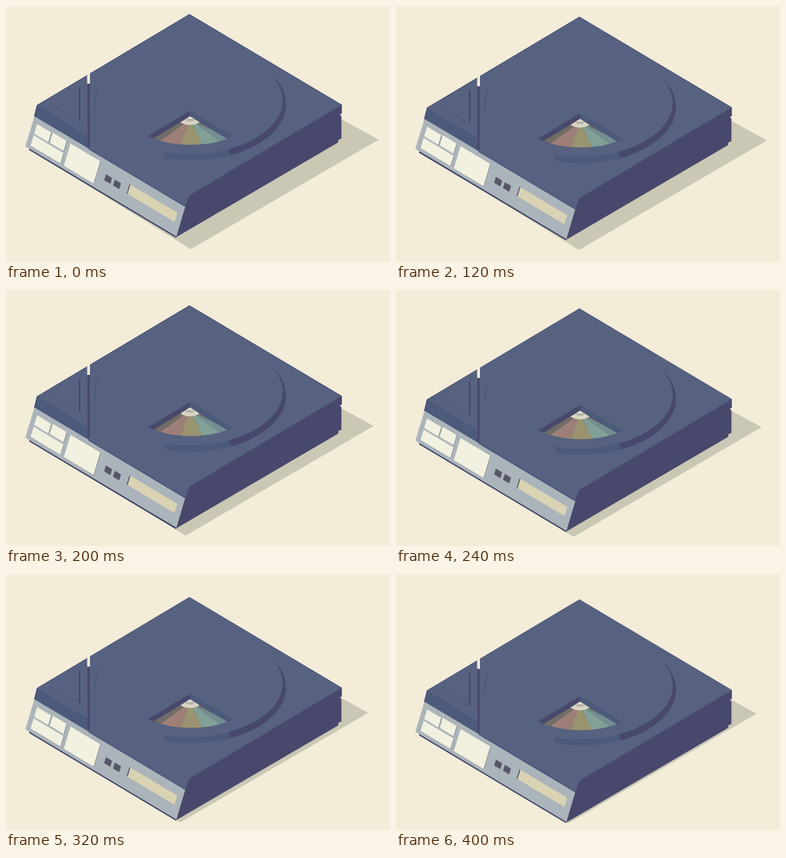
An HTML page with a canvas for the animation above (0.44 s loop, 480x320 px).

```html
<!DOCTYPE html>
<html lang="en">
<head>
<meta charset="utf-8">
<title>Floating disc player</title>
<style>
  html, body { margin: 0; width: 100%; height: 100%; overflow: hidden; background: #f2ecd9; }
  canvas { display: block; }
</style>
</head>
<body>
<canvas id="stage" width="480" height="320"></canvas>
<script>
const ctx = document.getElementById('stage').getContext('2d');
const LOOP = 440, STEP = 40, DROP = 22;
const PAPER = '#f2ecd9', SHADOW = '#cbc7b5', TOP = '#56627f', SIDE = '#47486b',
      EDGE = '#343c68', BEVEL = '#4c5a7b', PANEL = '#abb4ba', CREAM = '#f2f1e0';

// A plane maps (u, v) in 0..1 to the stage: origin + u * across + v * along.
const plane = (origin, across, along) => (u, v) =>
  [0, 1].map(i => origin[i] + u * across[i] + v * along[i]);
const lid = plane([39, 124], [190, 113], [190.3, -113.5]);
const panel = plane([35.5, 138], [188.5, 112.5], [-11.3, 37.5]);
const below = ([x, y], dy) => [x, y + dy];

function trace(points) {
  ctx.beginPath();
  points.forEach(point => ctx.lineTo(...point));
}

function fill(color, ...points) {
  if (points.length) trace(points);
  ctx.closePath();
  ctx.fillStyle = color;
  ctx.fill();
}

function line(color, width, ...points) {
  trace(points);
  ctx.strokeStyle = color;
  ctx.lineWidth = width;
  ctx.stroke();
}

function ellipse(color, x, y, rx, ry) {
  ctx.beginPath();
  ctx.ellipse(x, y, rx, ry, 0, 0, 2 * Math.PI);
  fill(color);
}

function inset(color, left, right, top, bottom) {
  fill(color, panel(left, top), panel(right, top), panel(right, bottom), panel(left, bottom));
}

// Crescent between the rim of the disc lid and its recess, from angle a to b.
function groove(color, a, b) {
  ctx.beginPath();
  ctx.ellipse(231, 123, 119, 70, 0, a, b);
  ctx.ellipse(229, 118, 117, 67, 0, b, a, true);
  fill(color);
}

function drawShadow(progress) {
  ctx.save();
  ctx.translate(-15.5 * progress, 7.5 * progress);
  fill(SHADOW, [466, 167], [231, 304], [40, 186], [380, 120]);
  ctx.restore();
}

function drawBody() {
  const left = lid(0, 0), back = lid(0, 1), right = lid(1, 1), front = lid(1, 0);
  const tip = below(panel(1, 1), 1), [x, y] = right;
  fill(SIDE, front, right, [x, y + 11], [x - 2, y + 12], [x, y + 14],
       [x, y + 42], [x - 4, y + 44], [x - 4, y + 47], tip, panel(1, 0));
  fill(TOP, left, back, right, front, panel(1, 0), panel(0, 0));
  fill(BEVEL, left, [103, 163], [103, 178], panel(0, 0));
  line(EDGE, 0.8, panel(0, 0), left, back, right, below(right, 11));
  line('#414a70', 0.7, right, front, panel(1, 0));
}

function drawLid() {
  groove(SIDE, -0.53, 1.14);
  groove(BEVEL, 1.14, 1.84);

  ctx.beginPath();
  ctx.moveTo(116, 100);
  ctx.quadraticCurveTo(110, 112, 111.5, 127);
  ctx.strokeStyle = '#4a5777';
  ctx.lineWidth = 1.4;
  ctx.stroke();

  line('#4a5777', 1, [55, 122], [91, 143]);
  line(SIDE, 1.8, [92, 102], [92, 143]);
  line(SIDE, 2.6, [103.2, 96], [103.2, 177]);
  line(PAPER, 3.5, [103.2, 83], [103.2, 97]);
}

function wedge(color, x, y, reach = 60, slope = 0.604) {
  fill(color, [x, y], [x - reach, y + reach * slope], [x + reach, y + reach * slope]);
}

function drawWindow() {
  ctx.save();
  ctx.beginPath();
  ctx.ellipse(231, 123, 86, 50.5, 0, 0, 2 * Math.PI);
  ctx.clip();
  wedge(SIDE, 230, 131);
  fill(BEVEL, [230, 131], [290, 167.2], [290, 174], [230, 138]);

  wedge('#706c66', 230, 138);
  ctx.clip();
  const slices = ['#9d7f78', '#999370', '#80a098', '#728e92'];
  const bounds = [177, 216, 249, 283, 310];
  slices.forEach((color, i) => fill(color, [230, 142], [bounds[i], 180], [bounds[i + 1], 180]));

  ellipse('#d8d5c5', 230, 143, 12.5, 5.8);
  ellipse('#b8b5a8', 230, 142.5, 5.5, 2);
  wedge('#e4e1d2', 230, 137, 5, 0.8);
  ctx.restore();
}

function drawButton(...sides) {
  ctx.save();
  ctx.translate(0.7, 0.5);
  inset('#858d96', ...sides);
  ctx.restore();
  inset(CREAM, ...sides);
}

function drawPanel() {
  inset(PANEL, 0, 1, 0, 1);
  line('#46527a', 1.3, panel(0.36, 0), panel(1, 0));
  fill('#303961', panel(0.025, 1), panel(1, 1), below(panel(1, 1), 1.8), below(panel(0.025, 1), 1.8));

  drawButton(0.028, 0.122, 0.17, 0.495);
  drawButton(0.131, 0.222, 0.145, 0.485);
  drawButton(0.028, 0.226, 0.545, 0.89);
  drawButton(0.249, 0.446, 0.155, 0.9);
  for (const u of [0.5, 0.559]) inset('#56566a', u, u + 0.041, 0.427, 0.625);
  inset('#d9d3b3', 0.652, 0.966, 0.308, 0.615);
  line('#4b4f5e', 1.2, panel(0.652, 0.308), panel(0.652, 0.615));
}

const easeInOut = x => x < 0.5 ? 2 * x * x : 1 - 2 * (1 - x) ** 2;

let start;
function tick(now) {
  start ??= now;
  const time = Math.floor((now - start) % LOOP / STEP) * STEP;
  const progress = easeInOut(time / LOOP);

  ctx.fillStyle = PAPER;
  ctx.fillRect(0, 0, 480, 320);
  drawShadow(progress);
  ctx.save();
  ctx.translate(0, DROP * progress);
  drawBody();
  drawLid();
  drawWindow();
  drawPanel();
  ctx.restore();
  requestAnimationFrame(tick);
}
requestAnimationFrame(tick);
</script>
</body>
</html>
```
